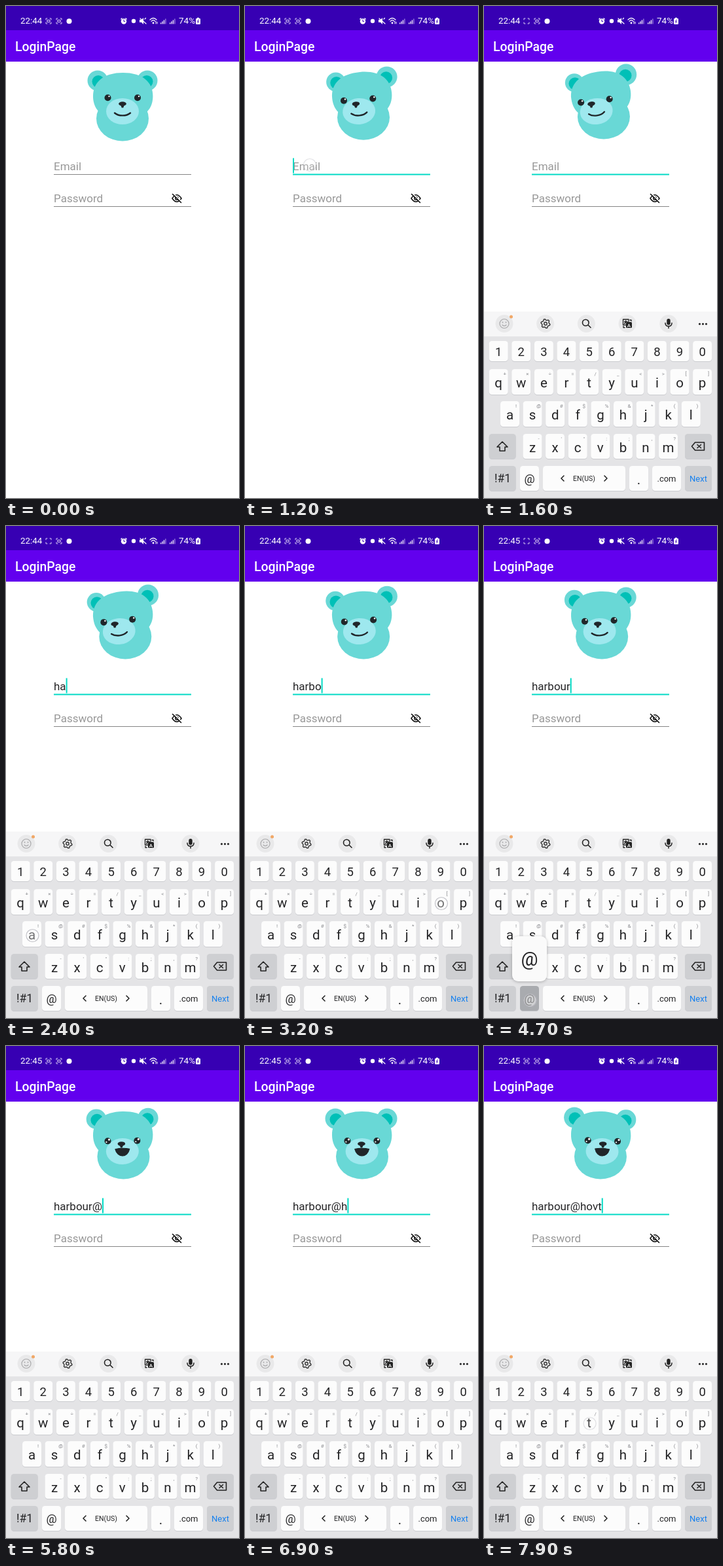
Recreate the animation shown at these times as an HTML page with a canvas. Size 356x752 px, loop 8 s.

```html
<!DOCTYPE html>
<html lang="en">
<head>
<meta charset="utf-8">
<title>Login page</title>
<style>
  html, body { margin: 0; width: 100%; height: 100%; overflow: hidden; background: #fff; }
  canvas { display: block; width: 356px; height: 752px; }
</style>
</head>
<body>
<canvas id="stage"></canvas>
<script>
const W = 356, H = 752, LOOP = 8000;
const canvas = document.getElementById('stage');
const dpr = window.devicePixelRatio || 1;
canvas.width = W * dpr;
canvas.height = H * dpr;
const c = canvas.getContext('2d');

const TEAL = '#03dac5', SKIN = '#69d8d6', EAR = '#00c0b7', MUZZLE = '#9ee8ee', DARK = '#20262a', INK = '#242426';
const EMAIL = 'harbour@hovt';
const KEY_TIMES = [2200, 2400, 2700, 2900, 3200, 3500, 3700, 4800, 6700, 7200, 7500, 7800];
const HOLD = 100, FOCUS = 1050;

const clamp = v => Math.max(0, Math.min(1, v));
const easeOut = v => 1 - (1 - clamp(v)) ** 2;
const mix = (a, b, k) => a + (b - a) * k;

function text(s, x, y, size, color, align = 'left', weight = 400) {
  c.font = `${weight} ${size}px Roboto, sans-serif`;
  c.fillStyle = color;
  c.textAlign = align;
  c.fillText(s, x, y);
}
function rect(x, y, w, h, color) {
  c.fillStyle = color;
  c.fillRect(x, y, w, h);
}
function round(x, y, w, h, r, color) {
  c.fillStyle = color;
  c.beginPath();
  c.roundRect(x, y, w, h, r);
  c.fill();
}
function oval(x, y, rx, ry, color, angle = 0) {
  c.fillStyle = color;
  c.beginPath();
  c.ellipse(x, y, rx, ry, angle, 0, 7);
  c.fill();
}
const disc = (x, y, r, color) => oval(x, y, r, r, color);
function line(d, x, y, color, width = 1.4) {
  c.save();
  c.translate(x, y);
  c.strokeStyle = color;
  c.lineWidth = width;
  c.lineCap = c.lineJoin = 'round';
  c.stroke(new Path2D(d));
  c.restore();
}
function shape(d, x, y, color) {
  c.save();
  c.translate(x, y);
  c.fillStyle = color;
  c.fill(new Path2D(d));
  c.restore();
}
function ring(x, y, alpha) {
  if (alpha <= 0) return;
  c.save();
  c.globalAlpha = alpha;
  disc(x, y, 10, 'rgba(255,255,255,.45)');
  c.strokeStyle = '#b4b4bb';
  c.lineWidth = 1.2;
  c.beginPath();
  c.arc(x, y, 9.5, 0, 7);
  c.stroke();
  c.restore();
}

// Status bar and title

function recorder(x, on) {
  line('M-4-2V-4H-2M2-4H4V-2M4 2V4H2M-2 4H-4V2', x, 23, '#d9ccf5', 1);
  if (on) {
    c.strokeStyle = '#d9ccf5';
    c.lineWidth = 1;
    c.strokeRect(x - 2, 21.5, 4, 3);
  }
}
function header(t) {
  rect(0, 0, W, 37, '#3700b3');
  rect(0, 37, W, 48, '#6200ee');
  text(t < 4300 ? '22:44' : '22:45', 22, 27.4, 13.4, '#fff');
  recorder(65, Math.floor((t - 300) / 500) % 2 !== 0);
  recorder(81, true);
  disc(96.5, 23.3, 4, '#fff');

  disc(180, 23.5, 4.2, '#fff');
  line('M-4-3L-3-4M4-3L3-4', 180, 23, '#fff', 1.6);
  line('M0-2V.7H1.8', 180, 23, '#3700b3', 1);
  disc(195, 23, 3.2, '#fff');
  shape('M-5-2H-2L1-5V5L-2 2H-5Z', 209, 23, '#fff');
  line('M-4-4L5 4M3-3L4.5-4.5', 209, 23, '#fff', 1.2);
  line('M-5-1Q0-6 5-1M-3 1.4Q0-2 3 1.4', 225, 22, '#fff', 1.2);
  disc(225, 26, 1.4, '#fff');
  line('M4 1V4.5M6 2V4.5', 225, 22.5, '#fff', 1);
  for (const x of [240, 254])
    for (let i = 0; i < 4; i++)
      rect(x - 4 + i * 2.4, 25.5 - i * 2, 1.3, 2 + i * 2, i < 3 ? '#fff' : '#a68be0');
  text('74%', 264, 27.4, 13.5, '#fff');
  round(290, 19, 7, 9, 1.3, '#fff');
  rect(292, 17.8, 3, 1.5, '#fff');
  line('M.8-2.5L-1 .3H1L-.8 2.5', 293.5, 23.5, '#3700b3', 1);

  text('LoginPage', 14, 69, 19.4, '#fff', 'left', 500);
}

// Bear

function headShape(x, y, rx, ry, angle) {
  const k = 0.63;
  c.save();
  c.translate(x, y);
  c.rotate(angle);
  c.scale(rx, ry);
  c.beginPath();
  c.moveTo(0, -1);
  c.bezierCurveTo(k, -1, 1, -k, 1, 0);
  c.bezierCurveTo(1, k, k, 1, 0, 1);
  c.bezierCurveTo(-k, 1, -1, k, -1, 0);
  c.bezierCurveTo(-1, -k, -k, -1, 0, -1);
  c.fillStyle = SKIN;
  c.fill();
  c.restore();
}
function eye(x, y, down, joy) {
  disc(x, y, 5, DARK);
  disc(x + 2, y - 2.2, mix(1.2, 1.6, joy), '#fff');
  if (joy > 0) disc(x - 2.1, y + 1.6, 1.1 * joy, '#fff');
}
function mouth(x, y, angle, joy) {
  const w = mix(12, 11, joy), top = mix(2, -4, joy), mid = mix(8.5, -6.5, joy), low = mix(8.5, 10, joy);
  c.save();
  c.translate(x, y);
  c.rotate(angle);
  c.beginPath();
  c.moveTo(-w, top);
  c.quadraticCurveTo(0, mid, w, top);
  c.bezierCurveTo(w * .72, low, -w * .72, low, -w, top);
  if (joy > 0) {
    c.fillStyle = DARK;
    c.fill();
  }
  c.lineCap = c.lineJoin = 'round';
  c.strokeStyle = DARK;
  c.lineWidth = mix(2.4, 1, joy);
  if (joy === 0) {
    c.beginPath();
    c.moveTo(-w, top);
    c.bezierCurveTo(-w * .5, 7.2, w * .5, 7.2, w, top);
  }
  c.stroke();
  c.restore();
}
function bear(turn, down, joy) {
  const tilt = turn * 0.0105;
  const ear = mix(114, 111, down);
  const leftX = mix(140, 138, down), rightX = mix(216, 217, down);
  const leftY = ear - turn * .45, rightY = ear + turn * .45;
  disc(leftX, leftY, 15.5 + turn * .1, SKIN);
  disc(rightX, rightY, 15.5 - turn * .05, SKIN);
  disc(leftX + 1, leftY + 1.5, 9.5, EAR);
  disc(rightX - 1, rightY + 1.5, 9.5, EAR);
  oval(mix(178, 179, down) - turn * .28, mix(172, 169, down), 40, 34.5, SKIN);
  headShape(178.7, mix(138, 136, down), 45.7, 36, tilt);

  const midX = 178 + .7 * down + turn * .5;
  oval(midX, 161, 25, 20, MUZZLE, tilt);
  const eyeY = mix(140.3, 145, down);
  eye(155.5 + down + turn * .6, eyeY - turn * .18, down, joy);
  eye(201 + .5 * down + turn * .7, eyeY + turn * .2, down, joy);
  const noseX = 178 + turn;
  oval(noseX, 149.5, 5.8, 3.3, DARK, tilt);
  shape('M-3 0H3L1.3 5H-1.3Z', noseX, 150.5, DARK);
  mouth(midX, 161.5, tilt, joy);
}

// Form

function fieldState(t) {
  const n = KEY_TIMES.filter(k => k <= t).length;
  const value = EMAIL.slice(0, n);
  const last = n ? KEY_TIMES[n - 1] : 1100;
  return { value, caret: t >= FOCUS && Math.floor((t - last) / 500) % 2 === 0 };
}
function caretX(n) {
  c.font = '400 17px Roboto, sans-serif';
  return 73 + c.measureText(EMAIL.slice(0, n)).width;
}
function turnAt(t) {
  const aim = n => -14 + (caretX(n) - 73) * .167;
  let turn = aim(0) * easeOut((t - FOCUS) / 400);
  KEY_TIMES.forEach((k, i) => turn += (aim(i + 1) - aim(i)) * easeOut((t - k + 50) / 250));
  return turn;
}
function form(t) {
  const { value, caret } = fieldState(t);
  const focused = t >= FOCUS;
  text(value || 'Email', 73, 250.5, 17, value ? INK : '#989898');
  rect(73, focused ? 256.5 : 257, 210, focused ? 2 : 1, focused ? TEAL : '#858585');
  if (caret) rect(caretX(value.length), 232.5, 2, 23, TEAL);
  text('Password', 73, 300, 17, '#989898');
  rect(73, 306, 210, 1, '#858585');
  line('M-7 0Q0-10.5 7 0Q0 10.5-7 0Z', 261, 294, '#111', 1.6);
  line('M-2.3 0A2.3 2.3 0 1 0 2.3 0A2.3 2.3 0 1 0-2.3 0', 261, 294, '#111', 1.5);
  line('M-5.2-7.2L7.4 5.4', 261, 294, '#fff', 1.6);
  line('M-6.5-6.5L6.5 6.5', 261, 294, '#111', 1.6);
  if (t >= 1000) ring(99, 243, .6 * (1 - clamp((t - 1100) / 300)));
}

// Keyboard

const STEP = 34.6;
const keys = {};
function addRow(chars, hints, x, y, h) {
  [...chars].forEach((ch, i) => keys[ch] = { ch, hint: hints[i] || '', x: x + i * STEP, y, w: 29, h });
}
addRow('1234567890', '', 7.7, 512, 31);
addRow('qwertyuiop', '+×÷=/_<>[]', 7.7, 555, 39);
addRow('asdfghjkl', '!@#$%&*()', 25, 604, 39);
addRow('zxcvbnm', '-\'":;,?', 59.5, 654, 38);
addRow('@', '', 55, 703, 38);
addRow('.', '', 222, 703, 38);

function cap(x, y, w, h, color) {
  round(x, y + 1, w, h, 4.5, '#cbccd0');
  round(x, y, w, h, 4.5, color);
}
function drawKey(k, pressed) {
  cap(k.x, k.y, k.w, k.h, pressed ? '#a9abaf' : '#fcfcfc');
  const digit = k.h === 31, x = k.x + k.w / 2;
  const size = digit ? 18.5 : k.ch === '@' ? 18 : 20.5;
  text(k.ch, x, k.y + (digit ? 22.5 : 27.5) - (k.ch === '@' ? 2 : 0), size, INK, 'center');
  if (k.hint) text(k.hint, k.x + k.w - 5, k.y + 9.5, 8, '#8b8c90', 'center');
}
function toolbar() {
  rect(0, 467, W, 38, '#f6f6f7');
  for (let i = 0; i < 5; i++) disc(31 + i * 62.7, 485.5, 13.5, '#e9e9ea');
  const y = 485.5;
  line('M-7 0A7 7 0 1 0 7 0A7 7 0 1 0-7 0M-3 2Q0 5 3 2', 31, y, '#a9a9ab', 1.2);
  disc(28.5, y - 2, 1, '#a9a9ab');
  disc(33.5, y - 2, 1, '#a9a9ab');
  disc(41.5, 475, 2.5, '#f0a868');

  let gear = '';
  for (let i = 0; i < 24; i++) {
    const a = (i + .5) * Math.PI / 12, r = i % 4 < 2 ? 7 : 5.4;
    gear += `${i ? 'L' : 'M'}${r * Math.cos(a)} ${r * Math.sin(a)}`;
  }
  line(gear + 'ZM-2.2 0A2.2 2.2 0 1 0 2.2 0A2.2 2.2 0 1 0-2.2 0', 94, y, '#333', 1.4);
  line('M-6-1.5A4.8 4.8 0 1 0 3.6-1.5A4.8 4.8 0 1 0-6-1.5M2.5 2L6.5 6', 156.5, y, '#222', 1.6);
  line('M-2 2H-6.5V-6.5H2V-3M-4.5-3H0M-2.3-4.5Q-2-1-4.5 0M4-5.5H6V-4M-6 4V6H-4', 219, y, '#222', 1.3);
  round(217, 483, 9, 9, 1.5, '#222');
  text('A', 221.5, 490.5, 8, '#fff', 'center', 500);
  round(279.3, 478, 5.4, 9.5, 2.7, '#222');
  line('M-5-1Q-5 4 0 4Q5 4 5-1M0 4V7', 282, y, '#222', 1.5);
  for (const x of [329.5, 334.5, 339.5]) disc(x, 486, 1.6, '#222');
}
function popup(k) {
  const x = Math.min(k.x + k.w / 2 - 26.5, 296);
  c.save();
  c.shadowColor = 'rgba(0,0,0,.25)';
  c.shadowBlur = 4 * dpr;
  c.shadowOffsetY = dpr;
  round(x, k.y - 76, 53, 69, 9, '#fafafa');
  c.restore();
  text(k.ch, x + 26.5, k.y - 31, 29, INK, 'center');
}
function keyboard(t) {
  const shown = easeOut((t - 1220) / 180);
  if (!shown) return;
  c.save();
  c.translate(0, 285 * (1 - shown));
  rect(0, 505, W, 247, '#e4e4e6');
  toolbar();

  const held = KEY_TIMES.findIndex(k => t >= k - HOLD && t < k);
  const down = held < 0 ? null : keys[EMAIL[held]];
  Object.values(keys).forEach(k => drawKey(k, k === down));

  const grey = '#cecfd2';
  cap(7.7, 654, 41, 38, grey);
  line('M0-8L8 0H4V6H-4V0H-8Z', 28, 674, '#222', 1.6);
  cap(307, 654, 41, 38, grey);
  line('M-10 0L-5-6H9V6H-5ZM-1.5-2.5L4 2.5M4-2.5L-1.5 2.5', 327.5, 673, '#222', 1.6);
  cap(7.7, 703, 41, 38, grey);
  text('!#1', 28.5, 728, 17.5, INK, 'center');
  cap(90, 703, 126, 38, '#fcfcfc');
  text('EN(US)', 153, 726, 10.5, INK, 'center');
  line('M2-4L-2 0L2 4', 120, 722, '#222', 1.6);
  line('M-2-4L2 0L-2 4', 186, 722, '#222', 1.6);
  cap(257, 703, 44, 38, '#fcfcfc');
  text('.com', 279, 727, 13, INK, 'center');
  cap(307, 703, 41, 38, grey);
  text('Next', 327.5, 727, 13, '#1680ee', 'center');

  KEY_TIMES.forEach((k, i) => {
    if (t < k - HOLD) return;
    const key = keys[EMAIL[i]];
    ring(key.x + key.w / 2 + 1, key.y + 22, 1 - clamp((t - k + 50) / 250));
  });
  if (down) popup(down);
  c.restore();
}

function draw(t) {
  c.setTransform(dpr, 0, 0, dpr, 0, 0);
  rect(0, 0, W, H, '#fff');
  header(t);
  bear(turnAt(t), easeOut((t - FOCUS) / 400), easeOut((t - 4800) / 250));
  form(t);
  keyboard(t);
}

const start = performance.now();
function tick() {
  draw((performance.now() - start) % LOOP);
  requestAnimationFrame(tick);
}
tick();
</script>
</body>
</html>
```
